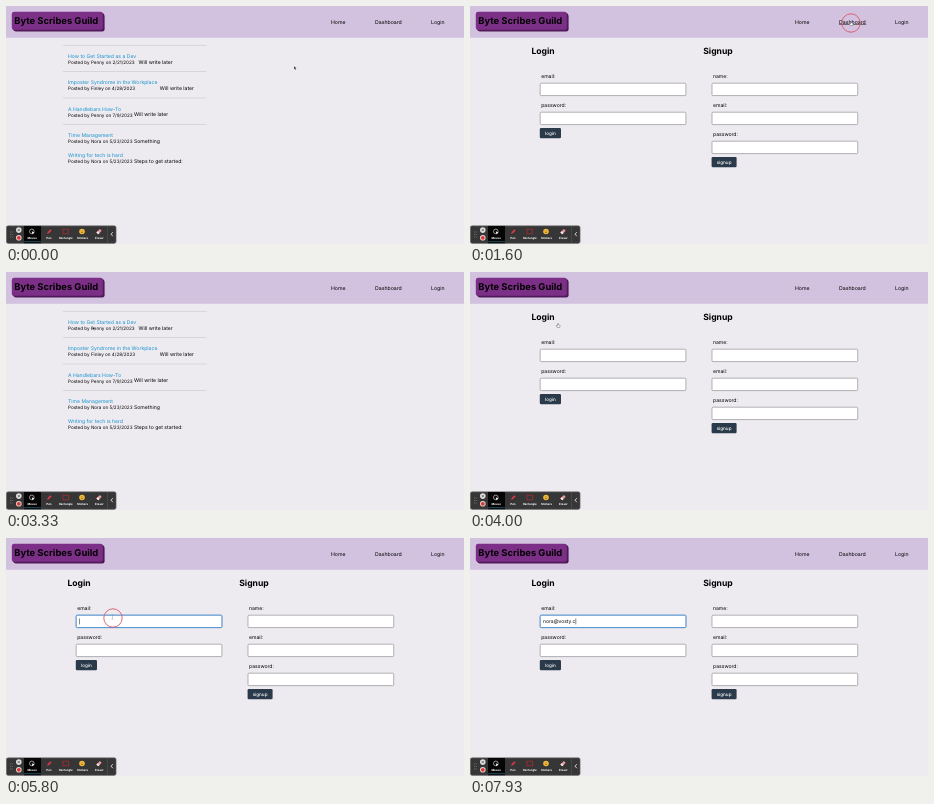
Animation, 458 px wide and 238 px high, one loop 8000 ms. Source, as an HTML page:

```html
<!DOCTYPE html>
<html lang="en">
<head>
<meta charset="utf-8">
<title>Blog walkthrough</title>
<style>
  html, body { margin: 0; width: 100%; height: 100%; overflow: hidden; background: #eeebf0; }
  svg { display: block; width: 458px; height: 238px; }
  /* the tiny turn switches off glyph hinting, so small text keeps its spacing */
  text { font-family: Inter, "Liberation Sans", sans-serif; text-rendering: geometricPrecision; white-space: pre; transform: rotate(.01deg); }
  .link { fill: #1a94cf; }
  .tool { font-weight: 700; fill: #fff; text-anchor: middle; }
  .button { font-weight: 500; fill: #fff; text-anchor: middle; }
</style>
</head>
<body>
<svg id="stage" viewBox="0 0 458 238">
  <rect width="458" height="238" fill="#eeebf0"/>
  <rect width="458" height="31.8" fill="#d3c2df"/>
  <g id="badge"></g>
  <g id="nav"></g>
  <g id="posts"></g>
  <g id="forms"></g>
  <g id="typing">
    <rect x="70.2" y="77.2" width="145.7" height="12.4" rx="1" fill="#fff" stroke="#3c8ad6" stroke-width=".9"/>
    <text id="typed" x="73" y="85.2" font-size="5" fill="#111"></text>
    <rect id="caret" y="80.4" width=".5" height="6" fill="#111"/>
  </g>
  <g id="toolbar"></g>
  <circle id="ring" fill="none" stroke="#da5468" stroke-width=".9"/>
  <g id="cursor">
    <path id="arrow" d="M0 0V3.5L.9 2.7L1.5 4L2.1 3.7L1.5 2.5H2.6Z" fill="#111" stroke="#fff" stroke-width=".3"/>
    <path id="hand" d="M-.4 -1.5q.5-.6.8 0v1.3l1.4.4q.4.2.3.8l-.4 1.5h-2.4l-1.3-1.7q.1-.6.7-.3l.9.5Z" fill="#fff" stroke="#444" stroke-width=".4"/>
    <path id="beam" d="M-.8-2.4Q0-2.4 0-1.8Q0-2.4.8-2.4M0-1.8V1.8M-.8 2.4Q0 2.4 0 1.8Q0 2.4.8 2.4" fill="none" stroke="#888" stroke-width=".4"/>
  </g>
</svg>
<script>
const LOOP = 8000;
const EMAIL = "nora@vosty.c";
const KEY_TIMES = [6330, 6460, 6600, 6730, 7060, 7190, 7300, 7400, 7530, 7660, 7860, 7930];
const CLICKS = [[1400, 381, 17], [2400, 337, 17], [3600, 88, 53], [5600, 107, 80]];

// time, x, y
const PATH = [
  [0, 288, 60], [60, 288, 60], [930, 378, 25], [1000, 378, 25], [1270, 381, 17],
  [1800, 381, 17], [2270, 337, 17], [2860, 337, 17], [3000, 325, 19],
  [3270, 86.5, 54.5], [3330, 86.5, 54.5], [3600, 88, 53], [4000, 88, 53],
  [4130, 88, 54], [5060, 88, 54], [5330, 106.5, 79]
];
// start time, cursor shape
const SHAPES = [[0, "arrow"], [870, "hand"], [1950, "arrow"], [2200, "hand"], [2950, "arrow"],
  [3400, "hand"], [5060, "arrow"], [5260, "beam"], [6330, ""]];
// start time, page
const PAGES = [[0, "posts"], [1600, "forms"], [2660, "posts"], [4000, "forms"]];

const $ = id => document.getElementById(id);
const show = (id, on) => $(id).setAttribute("visibility", on ? "visible" : "hidden");
const at = (steps, t) => steps.filter(s => s[0] <= t).pop()[1];
const text = (x, y, size, str, attrs = "") => `<text x="${x}" y="${y}" font-size="${size}" ${attrs}>${str}</text>`;
const rect = (x, y, w, h, attrs) => `<rect x="${x}" y="${y}" width="${w}" height="${h}" ${attrs}/>`;

function buildBadge() {
  const layer = (shift, fill) => rect(5.8 + shift, 5.8 + shift, 91, 18, `rx="2.4" fill="${fill}"`);
  return [1.8, 1.2, .6].map(s => layer(s, "#501a5a")).join("") + layer(0, "#7c2f86") +
    text(8.2, 18.4, 9.4, "Byte Scribes Guild", 'font-weight="700"');
}

function buildNav() {
  const link = (x, w, name, id) => text(x, 17.8, 5.2, name) +
    (id ? rect(x, 18.5, w, .5, `id="${id}" fill="#111"`) : "");
  return link(325, 15.2, "Home", "homeLine") + link(369, 27.2, "Dashboard", "dashLine") + link(425, 0, "Login");
}

function buildPosts() {
  const rows = [
    [52, "How to Get Started as a Dev", "Penny on 2/21/2023", 132.5, "Will write later"],
    [78.2, "Imposter Syndrome in the Workplace", "Finley on 4/28/2023", 153.8, "Will write later"],
    [104.6, "A Handlebars How-To", "Penny on 7/9/2023", 128, "Will write later"],
    [130.9, "Time Management", "Nora on 5/23/2023", 128, "Something"],
    [151, "Writing for tech is hard", "Nora on 5/23/2023", 128, "Steps to get started:"]
  ];
  const lines = [39.2, 65.6, 92, 118.4].map(y => rect(57, y - .3, 143.5, .6, 'fill="#c9c6cc"'));
  return lines.join("") + rows.map(([y, title, by, x, body]) =>
    text(62, y, 5.12, title, 'class="link"') +
    text(62, y + 6.1, 4.6, "Posted by " + by) +
    text(x, y + 5.6, 5.1, body)).join("");
}

function buildForm(x, title, labels, button, width) {
  const last = 77 + 29 * labels.length;
  return text(x - 8.6, 48, 8.6, title, 'font-weight="700"') +
    labels.map((label, i) => text(x + 1.2, 71.5 + 29 * i, 5.1, label) +
      rect(x + .2, 77.2 + 29 * i, 145.7, 12.4, 'rx="1" fill="#fff" stroke="#828287" stroke-width=".6"')).join("") +
    rect(x - .2, last - 13, width, 10.2, 'rx="1.2" fill="#2a3a4b"') +
    text(x - .2 + width / 2, last - 6.3, 4.6, button, 'class="button"');
}

function buildToolbar() {
  const names = ["Mouse", "Pen", "Rectangle", "Stickers", "Eraser"];
  const dots = [226, 228.5, 231].map(y =>
    `<path d="M4 ${y}h.8m1 0h.8" stroke="#999" stroke-width=".7"/>`).join("");
  return rect(.3, 219.8, 109.8, 17.6, 'rx="1.8" fill="#363637" stroke="#77747a" stroke-width=".6"') + dots +
    rect(18, 220, 17, 17.2, 'fill="#050505"') + rect(18, 235.5, 17, .6, 'fill="#2a7f98"') +
    rect(101.3, 220, .4, 17.2, 'fill="#666"') +
    `<circle cx="12.8" cy="224.1" r="2.8" fill="#ddd"/>
    <path d="M11.8 223.1l2 2m0-2l-2 2" stroke="#333" stroke-width=".6"/>
    <circle cx="12.8" cy="231.8" r="2.8" fill="#e9d9d9"/>
    <circle cx="12.8" cy="231.8" r="1.9" fill="#d8382f"/>
    <circle cx="25.8" cy="225.4" r="2.3" fill="none" stroke="#eee" stroke-width=".6"/>
    <path d="M25.8 225.2l.8 3.2.8-1.1 1.2-.5Z" fill="#fff"/>
    <path d="M41 227.8l.7-1.8 2.7-2.8 1.2 1.2-2.8 2.8Z" fill="#e2384a"/>
    <rect x="57" y="223.2" width="5.6" height="4.6" fill="none" stroke="#b82832" stroke-width=".7"/>
    <circle cx="76" cy="225.5" r="2.8" fill="#f0b93a"/>
    <path d="M74.8 226q1.2 1.7 2.4 0M75 224.7h.5m1 0h.5" fill="none" stroke="#69430d" stroke-width=".5"/>
    <path d="M90.4 226.5l3.4-3.5 1.9 1.8-3.4 3.4Z" fill="#ef98a5"/>
    <path d="M90.4 226.5l1.2-1.2 1.9 1.8-1.2 1.1Z" fill="#eee"/>
    <path d="M106.8 226.2l-1.8 2 1.8 2" fill="none" stroke="#fff" stroke-width=".8"/>` +
    names.map((n, i) => text(26.2 + 16.8 * i, 232.9, 2.8, n, 'class="tool"')).join("");
}

function cursorAt(t) {
  const i = PATH.findIndex(p => p[0] > t);
  if (i < 0) return PATH[PATH.length - 1].slice(1);
  const [t0, x0, y0] = PATH[i - 1], [t1, x1, y1] = PATH[i];
  const u = (t - t0) / (t1 - t0), e = u * u * (3 - 2 * u);
  return [x0 + (x1 - x0) * e, y0 + (y1 - y0) * e];
}

function drawRing(t) {
  const click = CLICKS.find(c => t >= c[0] && t < c[0] + 330);
  show("ring", click);
  if (!click) return;
  const age = t - click[0];
  const ring = $("ring");
  ring.setAttribute("cx", click[1]);
  ring.setAttribute("cy", click[2]);
  ring.setAttribute("r", 9.2 * Math.min(1, .3 + age / 190));
  ring.setAttribute("opacity", Math.min(1, (330 - age) / 90));
}

function draw(t) {
  const page = at(PAGES, t);
  show("posts", page === "posts");
  show("forms", page === "forms");
  show("dashLine", t >= 870 && t < 1950);
  show("homeLine", t >= 2200 && t < 2950);

  const focused = t >= 5670;
  const count = KEY_TIMES.filter(k => k <= t).length;
  const lastKey = count ? KEY_TIMES[count - 1] : 5670;
  show("typing", focused);
  $("typed").textContent = EMAIL.slice(0, count);
  $("caret").setAttribute("x", 73.2 + (count ? $("typed").getComputedTextLength() : 0));
  show("caret", focused && (t - lastKey) % 1000 < 500);

  const shape = at(SHAPES, t);
  for (const id of ["arrow", "hand", "beam"]) show(id, id === shape);
  $("cursor").setAttribute("transform", `translate(${cursorAt(t)})`);
  drawRing(t);
}

$("badge").innerHTML = buildBadge();
$("nav").innerHTML = buildNav();
$("posts").innerHTML = buildPosts();
$("forms").innerHTML = buildForm(70, "Login", ["email:", "password:"], "login", 21.2) +
  buildForm(241.8, "Signup", ["name:", "email:", "password:"], "signup", 25);
$("toolbar").innerHTML = buildToolbar();

const start = performance.now();
function tick() {
  draw((performance.now() - start) % LOOP);
  requestAnimationFrame(tick);
}
tick();
</script>
</body>
</html>
```
